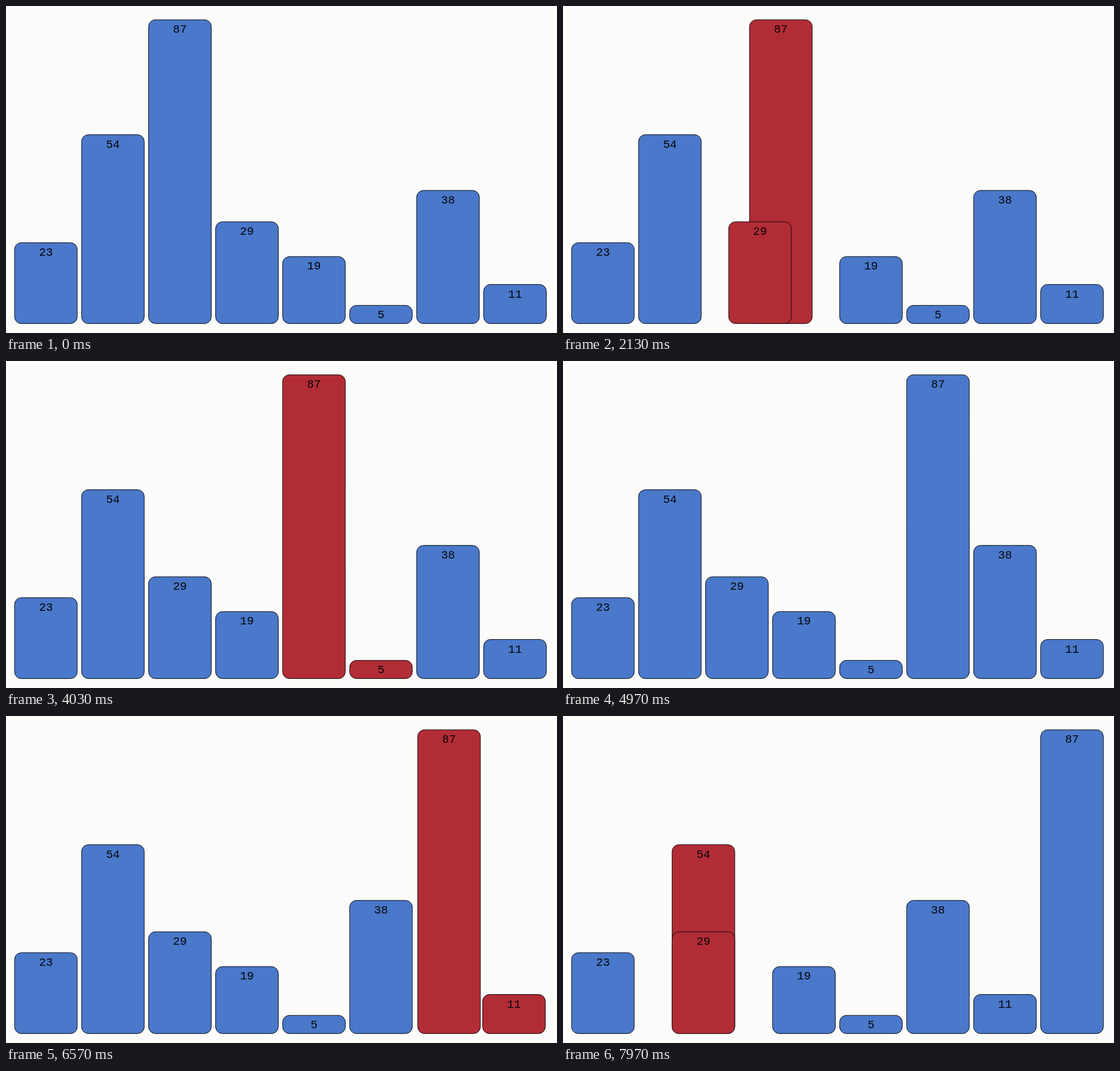
An HTML page with a canvas for the animation above (8000 ms loop, 972 px wide and 576 px high).

```html
<!DOCTYPE html>
<html lang="en">
<head>
<meta charset="utf-8">
<title>Bubble sort</title>
<style>
  html, body { margin: 0; width: 100%; height: 100%; overflow: hidden; background: #fcfdfa; }
  canvas { display: block; }
</style>
</head>
<body>
<canvas id="stage" width="972" height="576"></canvas>
<script>
const ctx = document.getElementById('stage').getContext('2d');
const values = [23, 54, 87, 29, 19, 5, 38, 11];

// Layout
const LEFT = 15.1, PITCH = 118.22, WIDTH = 110.6, BOTTOM = 559.4, RADIUS = 12;
const BLUE = '#4a78ca', RED = '#b22c36', PAPER = '#fcfdfa', INK = '#050507';

// Timing in ms
const LOOP = 8000, FIRST = 1665, PERIOD = 1182;
const HOLD = 171, MOVE = 450, RELEASE = HOLD + MOVE + 10;

// Swaps of a bubble sort, as slot indexes
function bubbleSwaps(list) {
  const a = list.slice(), swaps = [];
  for (let end = a.length - 1; end > 0; end--) {
    for (let i = 0; i < end; i++) {
      if (a[i] > a[i + 1]) {
        [a[i], a[i + 1]] = [a[i + 1], a[i]];
        swaps.push(i);
      }
    }
  }
  return swaps;
}
const swaps = bubbleSwaps(values);

function drawBar(value, slot, active) {
  const x = LEFT + slot * PITCH;
  const y = 558 - value * 6.135;
  ctx.beginPath();
  ctx.roundRect(x, y, WIDTH, BOTTOM - y, RADIUS);
  ctx.fillStyle = active ? RED : BLUE;
  ctx.fill();
  ctx.stroke();
  ctx.fillStyle = INK;
  ctx.fillText(value, x + WIDTH / 2, y + 23);
}

function draw(t) {
  const order = values.map((_, i) => i);
  const slots = order.slice();
  const active = new Set();

  for (let k = 0; k < swaps.length; k++) {
    const age = t - FIRST - k * PERIOD;
    if (age < 0) break;
    const s = swaps[k], a = order[s], b = order[s + 1];
    const p = Math.min(1, Math.max(0, (age - HOLD) / MOVE));
    slots[a] = s + p;
    slots[b] = s + 1 - p;
    if (age < RELEASE) active.add(a).add(b);
    order[s] = b;
    order[s + 1] = a;
  }

  ctx.fillStyle = PAPER;
  ctx.fillRect(0, 0, 972, 576);
  ctx.lineWidth = 1;
  ctx.strokeStyle = INK;
  ctx.font = '20.4px "Liberation Mono", monospace';
  ctx.textAlign = 'center';
  values.forEach((v, i) => drawBar(v, slots[i], active.has(i)));
}

const start = performance.now();
function tick() {
  draw((performance.now() - start) % LOOP);
  requestAnimationFrame(tick);
}
tick();
</script>
</body>
</html>
```
